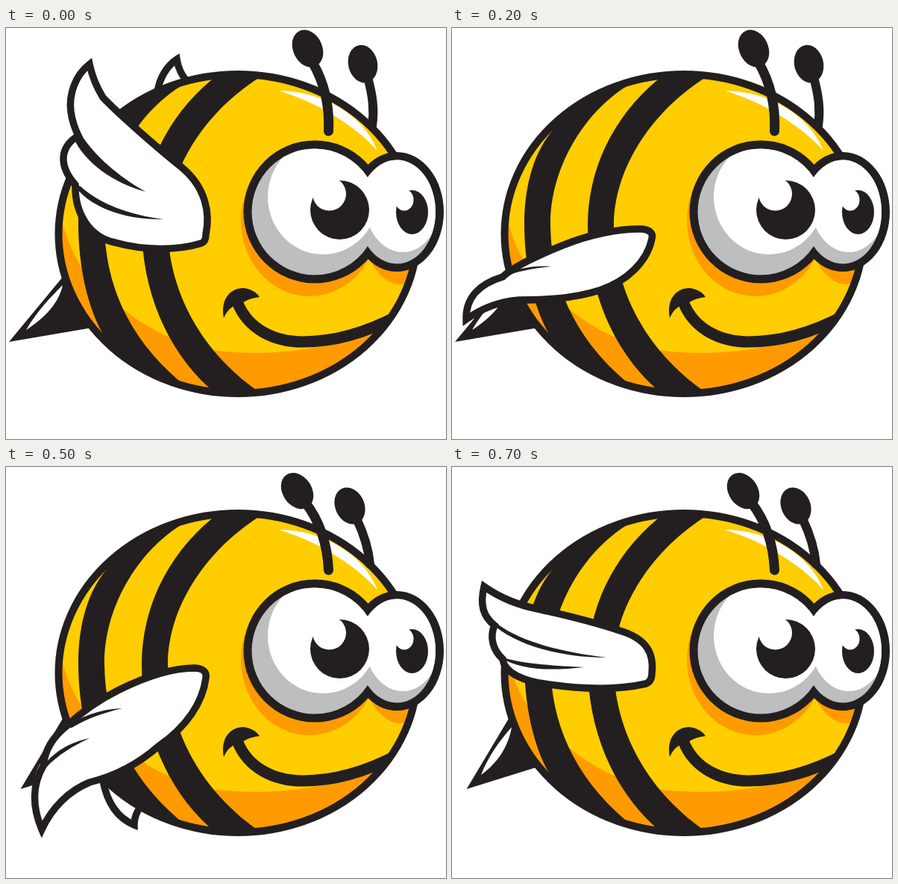
Recreate the animation shown at these times as an HTML page without scripts. Size 590 by 550 pixels, loop 800 ms.

```html
<!DOCTYPE html>
<html lang="en">
<head>
<meta charset="utf-8">
<title>Flying bee</title>
<style>
  html, body { margin: 0; width: 100%; height: 100%; overflow: hidden; background: #fff; }
  svg { display: block; width: 590px; height: 550px; }
  .ink { fill: #231f20; }
  .white { fill: #fff; }
  .yellow { fill: #ffcd00; }
  .orange { fill: #ff9b00; }
  .grey { fill: #bcbec0; }
  .line { fill: none; stroke: #231f20; stroke-linecap: round; }
  .wing { fill: #fff; stroke: #231f20; stroke-width: 9.5; stroke-miterlimit: 6; }

  /* Eight equal poses: up, mid, low, dip, down, dip, low, mid */
  .up, .mid, .low, .dip, .down, .a, .b {
    opacity: 0;
    animation: up .8s step-end infinite;
  }
  .mid { animation-name: mid; }
  .low { animation-name: low; }
  .dip { animation-name: dip; }
  .down { animation-name: down; }
  .a { animation-name: first; }
  .b { animation-name: second; }
  @keyframes up { 0% { opacity: 1 } 12.5%, 100% { opacity: 0 } }
  @keyframes mid { 0%, 25% { opacity: 0 } 12.5%, 87.5% { opacity: 1 } 100% { opacity: 0 } }
  @keyframes low { 0%, 37.5% { opacity: 0 } 25%, 75% { opacity: 1 } 87.5%, 100% { opacity: 0 } }
  @keyframes dip { 0%, 50% { opacity: 0 } 37.5%, 62.5% { opacity: 1 } 75%, 100% { opacity: 0 } }
  @keyframes down { 0% { opacity: 0 } 50% { opacity: 1 } 62.5%, 100% { opacity: 0 } }
  @keyframes first { 0% { opacity: 1 } 50%, 100% { opacity: 0 } }
  @keyframes second { 0% { opacity: 0 } 50%, 100% { opacity: 1 } }
</style>
</head>
<body>
<svg viewBox="0 0 590 550" xmlns="http://www.w3.org/2000/svg">
  <defs>
    <ellipse id="shell" cx="311" cy="275.5" rx="240.5" ry="213.5"/>
    <clipPath id="inBody"><use href="#shell"/></clipPath>
    <clipPath id="inEyes">
      <circle cx="414" cy="246" r="84.5"/>
      <ellipse cx="524" cy="246" rx="52" ry="69.5"/>
    </clipPath>
  </defs>

  <!-- Stinger -->
  <g class="a">
    <path class="ink" d="M4 420L77 332L90 330L116 401Z"/>
    <path class="white" d="M76 344C62 358 42 378 27 404C52 388 71 368 76 344Z"/>
  </g>
  <g class="b">
    <path class="ink" d="M19.500 431L77 335L90 330L116 401Z"/>
    <path class="white" d="M80 348C64 366 48 388 39 412C60 397 76 374 80 348Z"/>
  </g>

  <!-- Far wing -->
  <path class="wing up" d="M203 86C206 65 217 50 229 42C231 55 236 63 243 72"/>
  <path class="wing dip" d="M130 420C136 450 150 470 172 479C172 465 178 455 190 445"/>
  <path class="wing down" d="M174 450C170 495 190 526 224 539.500C221 515 227 497 238 480"/>

  <!-- Body -->
  <use href="#shell" class="yellow"/>
  <g clip-path="url(#inBody)">
    <path class="orange" d="M74 255C85 300 110 345 157 376C200 410 240 425 276 431C350 441 430 431 500 404L560 500H60Z"/>
    <ellipse class="orange" cx="407" cy="258" rx="92" ry="101"/>
    <ellipse class="orange" cx="530" cy="270" rx="50" ry="73"/>
    <path class="ink" d="M134 138C106 172 97 220 97 262C97 320 110 376 131 411L160 470L232 472C162 412 133 340 132 265C131 190 175 115 234 78L180 50L100 120Z"/>
    <path class="ink" d="M276 69C215 120 182 190 182 265C182 350 215 430 273 482L300 500L335 484C260 430 217 350 217 265C217 190 265 115 337 68L300 50Z"/>
    <path class="line" stroke-width="15" d="M311 369C325 402 358 420 398 420C445 420 488 405 526 385"/>
  </g>
  <use href="#shell" class="line" stroke-width="10"/>
  <path class="ink" d="M292 388C287 363 301 348 318 348C329 349 336 354 340 360C332 361 324 363 317 368L304 373Q296 378 292 388Z"/>
  <path class="white" d="M366 84C424 84 479 116 498 164C472 136 428 103 366 84Z"/>

  <!-- Antennae -->
  <g class="a">
    <path class="line" stroke-width="13" d="M411 46C428 75 434 105 432.500 138"/>
    <ellipse class="ink" cx="404.500" cy="27.500" rx="19.500" ry="26" transform="rotate(-25 404.500 27.500)"/>
    <path class="line" stroke-width="12" d="M485 66C492 92 494 110 491 131"/>
    <ellipse class="ink" cx="478.500" cy="48" rx="19.500" ry="25.500" transform="rotate(-13 478.500 48)"/>
  </g>
  <g class="b">
    <path class="line" stroke-width="13" d="M401 47C422 74 431 105 432.500 138"/>
    <ellipse class="ink" cx="390.500" cy="32" rx="19.500" ry="26" transform="rotate(-34 390.500 32)"/>
    <path class="line" stroke-width="12" d="M470 69C480 90 486 108 488 130"/>
    <ellipse class="ink" cx="461" cy="52" rx="19.500" ry="25.500" transform="rotate(-24 461 52)"/>
  </g>

  <!-- Eyes -->
  <circle class="ink" cx="414" cy="246" r="95.500"/>
  <ellipse class="ink" cx="524" cy="246" rx="63" ry="80"/>
  <g clip-path="url(#inEyes)">
    <path class="grey" d="M320 150H590V340H320Z"/>
    <ellipse class="white" cx="425" cy="226" rx="74" ry="77"/>
    <ellipse class="white" cx="532" cy="230" rx="52" ry="70"/>
  </g>
  <circle class="ink" cx="447.500" cy="243.500" r="39.500"/>
  <circle class="white" cx="433.500" cy="222" r="22.500"/>
  <ellipse class="ink" cx="544.500" cy="246.500" rx="21.500" ry="29.500"/>
  <ellipse class="white" cx="534" cy="230" rx="12.500" ry="14.500"/>

  <!-- Near wing -->
  <g class="up">
    <path class="wing" d="M112 48.500C92 64 84 90 87 112C89 127 93 136 97 144C71 160 71 185 93 210C92 248 112 280 146 287C185 298 230 298 262 288Q268 286 268 276C274 248 268 213 235 186C200 158 150 114 130 93Q117 72 112 48.500Z"/>
    <path class="ink" d="M90 146C105 180 145 208 187 219C150 198 120 172 101 143Z"/>
    <path class="ink" d="M90 208C110 240 160 257 211 256C165 250 125 235 100 212Z"/>
  </g>
  <g class="mid">
    <path class="wing" d="M43 160C37 185 42 200 57 212C50 228 55 245 68 257C70 275 95 287 130 291C180 298 225 298 260 290Q268 287 268 276C271 250 262 230 225 219C180 204 150 198 115 190C85 184 60 172 43 160Z"/>
    <path class="ink" d="M52 208C85 240 150 255 207 255C150 248 95 235 62 211Z"/>
    <path class="ink" d="M64 254C90 272 130 273 177 268C140 266 100 264 72 256Z"/>
  </g>
  <g class="low">
    <path class="wing" d="M19 390C18 360 38 342 68 333C82 320 118 303 148 291C185 276 225 268 255 269Q271 271 268 282C262 312 235 339 198 351C160 363 120 364 90 364C62 366 40 375 19 390Z"/>
    <path class="ink" d="M62 334C85 322 105 318 133 319C105 322 85 326 68 334Z"/>
  </g>
  <g class="dip">
    <path class="wing" d="M48 485C35 455 35 425 50 400C52 378 64 360 82 346C98 331 122 313 150 299C188 280 225 269 253 269Q270 270 268 282C264 315 242 348 204 374C172 402 140 415 112 422C85 433 62 455 48 485Z"/>
    <path class="ink" d="M80 348C100 334 125 324 156 323C130 329 108 337 88 349Z"/>
    <path class="ink" d="M48 403C62 382 86 368 112 363C90 373 70 385 54 402Z"/>
  </g>
  <g class="down">
    <path class="wing" d="M101 539C68 524 51 498 51 470C51 455 53 446 57 436C50 412 58 382 84 358C100 342 118 327 140 312C175 290 215 270 250 270Q268 270 267 282C264 315 250 350 233 368C205 398 175 430 148 452C118 476 100 500 101 539Z"/>
    <path class="ink" d="M82 360C105 340 140 328 174 326C145 334 115 344 92 362Z"/>
    <path class="ink" d="M55 440C70 405 100 383 127 376C105 390 80 410 62 438Z"/>
  </g>
</svg>
</body>
</html>
```
